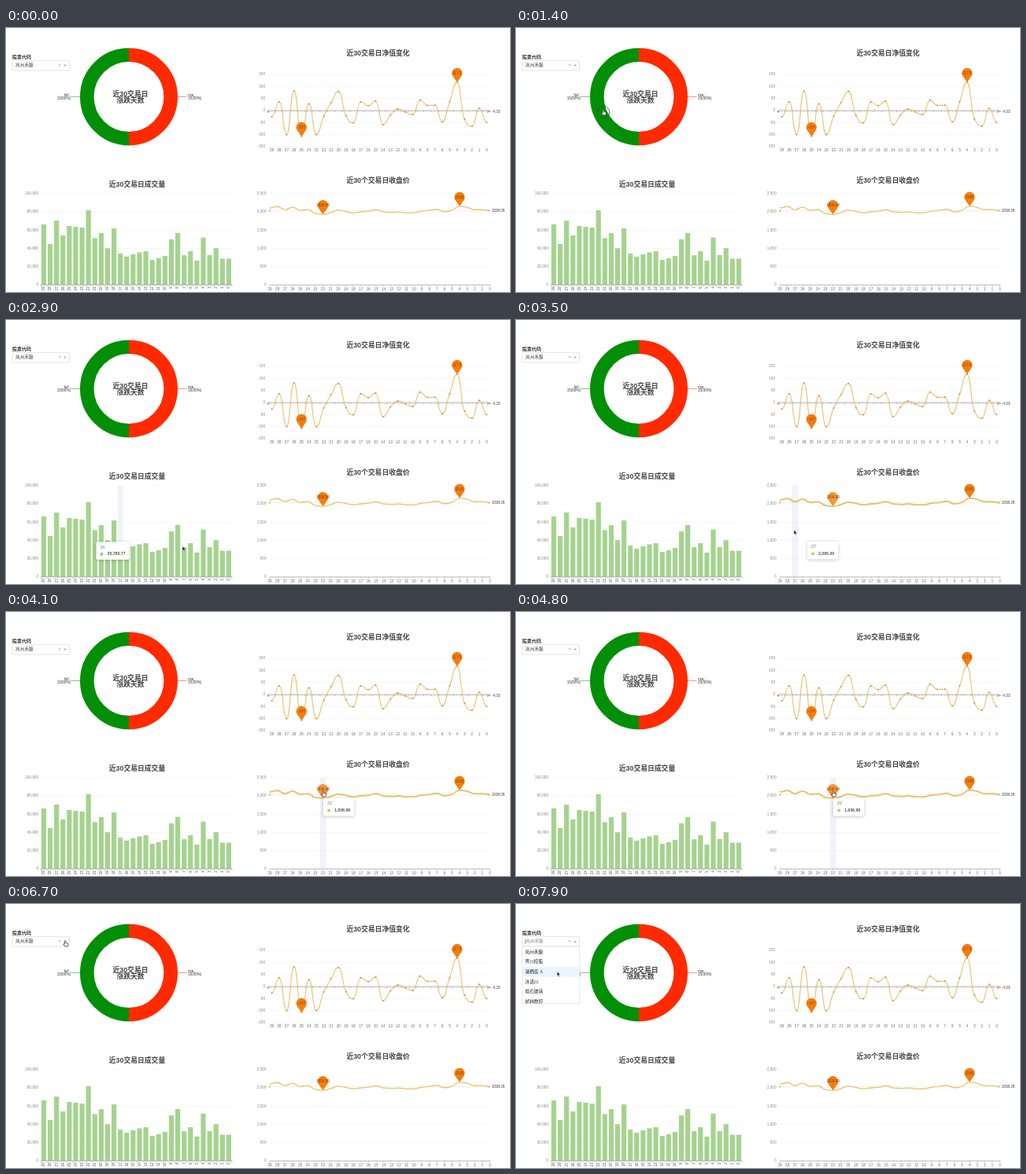
Recreate the animation shown at these times as an HTML page with a canvas. Size 640 by 336 pixels, loop 8 s.

```html
<!DOCTYPE html>
<html lang="zh">
<head>
<meta charset="utf-8">
<style>
html, body { margin: 0; width: 100%; height: 100%; overflow: hidden; background: #fff; }
canvas { display: block; width: 640px; height: 336px; }
</style>
</head>
<body>
<canvas id="stage"></canvas>
<script>
const W = 640, H = 336, LOOP = 8000, STEP = 100;
const canvas = document.getElementById('stage');
const ctx = canvas.getContext('2d');
const dpr = window.devicePixelRatio || 1;
canvas.width = W * dpr;
canvas.height = H * dpr;

const SANS = '"Liberation Sans", "Noto Sans CJK SC", "Noto Sans CJK", sans-serif';
const SERIF = '"Liberation Serif", "Noto Serif", "Noto Sans CJK SC", "Noto Sans CJK", serif';
const YELLOW = '#e6c370', ORANGE = '#f57d0c', LIT = '#f6953a';

// Series run from day 29 down to day 0.
const net = [-26, 36, -100, 81, -107, 28, -100, -23, 33, 79, -21, -51, 36, 20, 39,
  -59, -19, 6, -6, -17, 43, 21, 22, -47, 36, 117.5, -36, -65, 9, -50];
const volume = [66.4, 44.8, 70.6, 54.3, 64.7, 63.8, 62.9, 82, 51.3, 56.8, 40.3, 62, 34.4, 31, 33.6,
  35.78077, 37, 27.5, 29.3, 31.8, 50, 57, 32.6, 37, 26.7, 51.9, 32.7, 40.3, 28.7, 28.8].map(v => v * 1000);
const close = [2112, 2150, 2065, 2132, 2045, 2066, 1960, 1936.99, 1982, 2048, 2020, 1978, 2004, 2022, 2062,
  2000, 1990, 2002, 1976, 1980, 2024, 2044, 2074, 2006, 2048, 2160, 2128, 2064, 2066, 2036];

const charts = {
  net: { data: net, x: i => 337.6 + i * 9.41, y: v => 105 - v * 0.307, top: 59, bottom: 151, band: 8, dot: '#cf7a68' },
  bar: { data: volume, x: i => 48 + i * 8.1, y: v => 327 - v * 0.00116, top: 211, bottom: 327, band: 7, dot: '#a9aca8' },
  close: { data: close, x: i => 335 + i * 9.64, y: v => 327 - v * 0.0464, top: 211, bottom: 327, band: 8, dot: '#e9bb50' }
};

const stocks = ['岚州禾酿', '霁川控股', '澜栖岳 A', '沐诺川', '晗石玻璃', '峤林数控'];

// Pointer and tooltip paths: [ms, x, y]
const pointer = [[200, 305, 345], [1000, 112, 106], [1400, 111, 107], [1700, 111, 108], [2300, 70, 272],
  [2600, 105, 282], [2800, 169, 287], [2900, 225, 290], [3100, 276, 290], [3400, 338, 281],
  [3800, 401, 234], [4000, 403, 231], [4800, 403, 231], [5300, 377, 127], [5800, 377, 127],
  [6500, 75, 50], [7200, 76, 50], [7700, 53, 88], [8000, 53, 88]];
const tipPath = [[2300, 82, 273], [2600, 90, 278], [2900, 114.5, 282.5], [3200, 225, 285],
  [3201, 358, 290], [3500, 370, 282], [3900, 402, 240], [4100, 403, 237], [4900, 403, 237],
  [5300, 387, 238], [5400, 387, 230], [5700, 387, 143], [5900, 387, 140]];
// [from, to, chart, tip day, band day]
const hovers = [[2300, 2500, 'bar', 26, 26], [2500, 2700, 'bar', 22, 23], [2700, 2800, 'bar', 20, 20],
  [2800, 3000, 'bar', 14, 17], [3000, 3100, 'bar', 7, 7], [3100, 3200, 'bar', 1, 1],
  [3400, 3500, 'close', 28, 28], [3500, 3600, 'close', 27, 27], [3600, 3700, 'close', 25, 25],
  [3700, 3800, 'close', 23, 23], [3800, 4900, 'close', 22, 22], [5300, 5900, 'net', 25, 25]];

function at(path, t) {
  let k = 0;
  while (k < path.length - 2 && t >= path[k + 1][0]) k++;
  const [a, ax, ay] = path[k], [b, bx, by] = path[k + 1];
  const u = Math.max(0, Math.min(1, (t - a) / (b - a)));
  return [ax + (bx - ax) * u, ay + (by - ay) * u];
}

function text(s, x, y, size, color = '#555', align = 'left', weight = '', family = SANS) {
  ctx.font = `${weight} ${size}px ${family}`;
  ctx.fillStyle = color;
  ctx.textAlign = align;
  ctx.textBaseline = 'middle';
  ctx.fillText(s, x, y);
}

function line(x1, y1, x2, y2, color, width = 0.6, dash = []) {
  ctx.strokeStyle = color;
  ctx.lineWidth = width;
  ctx.setLineDash(dash);
  ctx.beginPath();
  ctx.moveTo(x1, y1);
  ctx.lineTo(x2, y2);
  ctx.stroke();
  ctx.setLineDash([]);
}

function disc(x, y, r, color) {
  ctx.fillStyle = color;
  ctx.beginPath();
  ctx.arc(x, y, r, 0, Math.PI * 2);
  ctx.fill();
}

function shape(points, fill, stroke, width = 0.6) {
  ctx.beginPath();
  points.forEach(([x, y]) => ctx.lineTo(x, y));
  ctx.closePath();
  if (fill) { ctx.fillStyle = fill; ctx.fill(); }
  if (stroke) { ctx.strokeStyle = stroke; ctx.lineWidth = width; ctx.stroke(); }
}

const title = (s, x, y) => text(s, x, y, 8.8, '#464646', 'center', 'bold');

function smooth(pts, color, width) {
  const clamp = (v, a, b) => Math.max(Math.min(a, b), Math.min(Math.max(a, b), v));
  const slope = pts.map((p, i) => {
    const a = pts[i - 1], b = pts[i + 1];
    return a && b ? (b[1] - a[1]) / 4 : 0;
  });
  // Keep both handles of a point inside the span of its neighbours.
  pts.forEach((p, i) => {
    const a = pts[i - 1], b = pts[i + 1];
    if (!a || !b) return;
    const ahead = clamp(p[1] + slope[i], p[1], b[1]) - p[1];
    slope[i] = p[1] - clamp(p[1] - ahead, a[1], p[1]);
  });
  const h = (pts[1][0] - pts[0][0]) / 2;
  ctx.beginPath();
  ctx.moveTo(...pts[0]);
  for (let i = 1; i < pts.length; i++) {
    const [x0, y0] = pts[i - 1], [x1, y1] = pts[i];
    ctx.bezierCurveTo(x0 + h, y0 + slope[i - 1], x1 - h, y1 - slope[i], x1, y1);
  }
  ctx.strokeStyle = color;
  ctx.lineWidth = width;
  ctx.lineJoin = 'round';
  ctx.stroke();
}

function pin(x, tip, label, lit) {
  const y = tip - 11.4, r = 6.7, a = 0.42;
  ctx.fillStyle = lit ? LIT : ORANGE;
  ctx.beginPath();
  ctx.arc(x, y, r, Math.PI - a, a);
  ctx.quadraticCurveTo(x + 4.4, y + 5.6, x, tip);
  ctx.quadraticCurveTo(x - 4.4, y + 5.6, x - r * Math.cos(a), y + r * Math.sin(a));
  ctx.fill();
  text(label, x, y + 0.3, 4.6, '#7c4312', 'center');
}

function band(chart, day) {
  const c = charts[chart];
  ctx.fillStyle = 'rgba(205,218,238,.3)';
  ctx.fillRect(c.x(29 - day) - c.band / 2, c.top, c.band, c.bottom - c.top);
}

function yAxis(chart, values, x, left, right) {
  values.forEach(v => {
    const y = charts[chart].y(v);
    if (v) line(left, y, right, y, '#efefef', 0.5);
    text(v.toLocaleString('en-US'), x, y, 4.7, '#858585', 'right');
  });
}

function ticks(start, step, y, size) {
  for (let i = 0; i < 31; i++) line(start + i * step, y, start + i * step, y + size, '#999', 0.5);
}

function donut() {
  const cx = 156, cy = 87.5, r = 53.2;
  ctx.lineWidth = 17.6;
  [['#ff2a00', -1], ['#008f06', 1]].forEach(([color, turn]) => {
    ctx.strokeStyle = color;
    ctx.beginPath();
    ctx.arc(cx, cy, r, turn * Math.PI / 2, turn * Math.PI / 2 + Math.PI);
    ctx.stroke();
  });
  title('近30交易日', 158, 84.5);
  title('涨跌天数', 158, 93);
  line(82.5, 87.5, 94, 87.5, '#008f06', 0.5);
  line(218, 87.5, 229.5, 87.5, '#ff2a00', 0.5);
  text('fall :', 82, 85.7, 4.6, '#333', 'right');
  text('15(50%)', 82, 90, 4.6, '#333', 'right');
  text('rise :', 231, 85.7, 4.6, '#333');
  text('15(50%)', 231, 90, 4.6, '#333');
}

function bars(hover) {
  const c = charts.bar;
  title('近30交易日成交量', 166.5, 199.5);
  yAxis('bar', [0, 20000, 40000, 60000, 80000, 100000], 41, 44, 287);
  if (hover) band('bar', hover[4]);
  ctx.fillStyle = '#a5d38f';
  volume.forEach((v, i) => ctx.fillRect(c.x(i) - 3.1, c.y(v), 6.2, 327 - c.y(v)));
  line(44, 327, 287.3, 327, '#888', 0.6);
  ticks(44, 8.1, 327, 2);
  volume.forEach((v, i) => {
    ctx.save();
    ctx.translate(c.x(i), 329);
    ctx.rotate(-Math.PI / 2);
    text(29 - i, 0, 0, 4.8, '#555', 'right');
    ctx.restore();
  });
}

function netChart(hover) {
  const c = charts.net;
  title('近30交易日净值变化', 472.5, 33);
  yAxis('net', [-150, -100, -50, 0, 50, 100, 150], 329, 333, 615);
  if (hover) band('net', hover[4]);
  line(333, 105, 615, 105, '#888', 0.6);
  ticks(333, 9.41, 105, 2.2);
  net.forEach((v, i) => text(29 - i, c.x(i), 156, 4.7, '#666', 'center'));
  const pts = net.map((v, i) => [c.x(i), c.y(v)]);
  smooth(pts, YELLOW, hover ? 1.7 : 1.1);
  pts.forEach(([x, y]) => disc(x, y, 0.95, '#c98256'));
  line(333, 106.4, 611, 106.4, '#d9a39b', 0.5, [2, 1.5]);
  disc(333, 106.4, 1.2, '#d77c75');
  shape([[615, 106.4], [610.5, 104.5], [611.7, 106.4], [610.5, 108.3]], '#e0807c');
  text('-4.33', 617, 106.5, 4.6, '#333');
  pin(pts[4][0], pts[4][1], '-107', hover);
  pin(pts[25][0], pts[25][1], '117.5', false);
}

function closeChart(hover) {
  const c = charts.close;
  title('近30个交易日收盘价', 472.5, 195);
  yAxis('close', [0, 500, 1000, 1500, 2000, 2500], 330.5, 335, 615);
  if (hover) band('close', hover[4]);
  line(335, 327, 615, 327, '#888', 0.6);
  ticks(335, 9.64 * 29 / 30, 327, 0);
  close.forEach((v, i) => {
    line(c.x(i), 327, c.x(i), 329, '#999', 0.5);
    text(29 - i, c.x(i), 332.3, 4.7, '#666', 'center');
  });
  const pts = close.map((v, i) => [c.x(i), c.y(v)]);
  smooth(pts, YELLOW, hover ? 2 : 1.3);
  line(335, 232.4, 613, 232.4, '#e9cd8b', 0.5, [2, 1.5]);
  disc(335, 232.4, 1.2, '#e9b660');
  shape([[615.5, 232.4], [611.5, 230.8], [612.5, 232.4], [611.5, 234]], '#e9bb60');
  text('2038.35', 617, 232.5, 4.5, '#333');
  pin(pts[7][0], pts[7][1], '1936.99', hover);
  pin(pts[25][0], pts[25][1], '2160', false);
}

function tooltip(hover, t) {
  const [, , name, day] = hover, c = charts[name];
  const [x, y] = at(tipPath, t);
  const value = c.data[29 - day].toLocaleString('en-US', { minimumFractionDigits: name === 'net' ? 0 : 2 });
  ctx.font = `bold 5.2px ${SANS}`;
  const w = ctx.measureText(value).width + 19;
  ctx.save();
  ctx.shadowColor = 'rgba(0,0,0,.22)';
  ctx.shadowBlur = 4 * dpr;
  ctx.shadowOffsetY = dpr;
  ctx.fillStyle = '#fff';
  ctx.beginPath();
  ctx.roundRect(x, y, w, 22.5, 1.8);
  ctx.fill();
  ctx.restore();
  text(day, x + 5, y + 6.7, 5.2, '#666');
  disc(x + 7, y + 15.5, 1.9, c.dot);
  text(value, x + 14, y + 15.5, 5.2, '#555', 'left', 'bold');
}

function select(open, pointerY) {
  text('股票代码', 8, 37.3, 6, '#333', 'left', 'bold');
  ctx.strokeStyle = '#d0d0d0';
  ctx.lineWidth = 0.6;
  ctx.fillStyle = '#fff';
  ctx.beginPath();
  ctx.roundRect(8, 41.3, 72.5, 12.7, 1.5);
  ctx.fill();
  ctx.stroke();
  text(stocks[0], 12, 47.8, 5.7, open ? '#8a8a8a' : '#444', 'left', '', SERIF);
  text('×', 68, 47.7, 6, '#999', 'center');
  const d = open ? -1 : 1;
  shape([[73.2, 47.7 - d], [76.8, 47.7 - d], [75, 47.7 + d]], '#999');
  if (!open) return;
  line(11.7, 44.5, 11.7, 51, '#555', 0.5);
  ctx.save();
  ctx.beginPath();
  ctx.rect(7.7, 54, 73.2, 73);
  ctx.clip();
  ctx.fillStyle = '#fff';
  ctx.fillRect(7.7, 54, 73.2, 73);
  stocks.forEach((name, i) => {
    const y = 54.7 + i * 12.7;
    if (pointerY >= y && pointerY < y + 12.7) {
      ctx.fillStyle = '#ebf5ff';
      ctx.fillRect(8, y, 72.7, 12.7);
    }
    text(name, 11.5, y + 6.5, 5.7, '#222', 'left', '', SERIF);
  });
  ctx.restore();
  ctx.strokeStyle = '#d4d4d4';
  ctx.lineWidth = 0.6;
  ctx.strokeRect(8, 54, 72.7, 72.7);
}

function cursor(x, y, hand) {
  ctx.save();
  ctx.translate(x, y);
  if (hand) {
    shape([[-1, -2.6], [0, -3.2], [0.7, -2.5], [0.8, -0.4], [3.4, 0.2], [3.6, 2], [2.8, 4], [-0.4, 4],
      [-2.7, 1.2], [-2, 0.5], [-0.8, 1.3]], '#fff', '#222', 0.7);
  } else {
    shape([[-0.8, -2], [-0.8, 3.6], [0.5, 2.5], [1.4, 4.4], [2.3, 4], [1.4, 2.1], [3.1, 2]], '#111', '#fff', 0.4);
  }
  ctx.restore();
}

function draw(now) {
  const t = Math.floor(now % LOOP / STEP) * STEP;
  const hover = hovers.find(h => t >= h[0] && t < h[1]);
  const over = name => hover && hover[2] === name ? hover : null;
  const [px, py] = at(pointer, t);
  const open = t >= 7200;

  ctx.setTransform(dpr, 0, 0, dpr, 0, 0);
  ctx.fillStyle = '#fff';
  ctx.fillRect(0, 0, W, H);
  donut();
  bars(over('bar'));
  netChart(over('net'));
  closeChart(over('close'));
  select(open, py);
  if (hover) tooltip(hover, t);

  if (t >= 1300 && t < 1700) {
    ctx.strokeStyle = '#3c4a3c';
    ctx.lineWidth = 0.8;
    ctx.beginPath();
    ctx.arc(111, 107, 7.7, 0, Math.PI * 2);
    ctx.stroke();
  }
  const ring = Math.hypot(px - 156, py - 87.5);
  const onPin = (t >= 3900 && t < 4900) || (t >= 5300 && t < 5900);
  const onSelect = px < 81 && py > 41 && py < 54;
  if (t >= 200) cursor(px, py, onPin || onSelect || (ring > 44 && ring < 62));
  requestAnimationFrame(draw);
}
requestAnimationFrame(draw);
</script>
</body>
</html>
```
